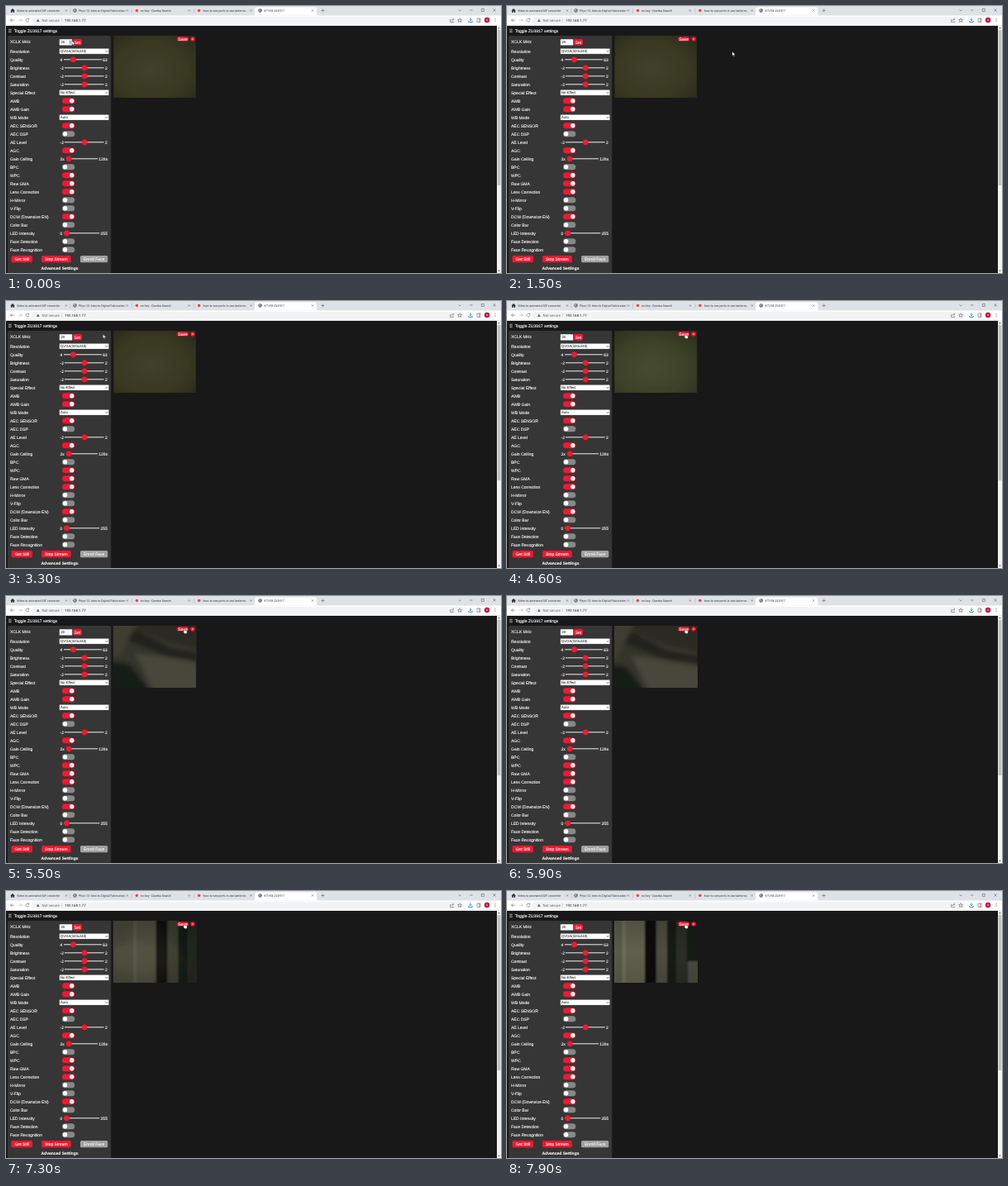
Recreate the animation shown at these times as an HTML page. Size 600x323 px, loop 8 s.

```html
<!DOCTYPE html>
<html lang="en">
<head>
<meta charset="utf-8">
<title>Camera settings</title>
<style>
  html, body { margin: 0; width: 100%; height: 100%; overflow: hidden; background: #181818; }
  svg { display: block; width: 100vw; height: 100vh; }
  text { font: 5px "Liberation Sans", Arial, sans-serif; fill: #f4f4f4; stroke: #f4f4f4; stroke-width: .13; white-space: pre; text-rendering: geometricPrecision; }
  .tab, .url, .field { stroke: none; }
  .tab { font: 3.65px Roboto, "Open Sans", sans-serif; fill: #33363a; }
  .url { font: 4.4px Roboto, "Open Sans", sans-serif; fill: #202124; }
  .grey { fill: #5f6368; }
  .field { font-size: 4.25px; fill: #000; }
  .mid { text-anchor: middle; }
  .line { fill: none; stroke: #5f6368; stroke-width: .6; }

  #arrow, #hand, #spin, .scene, .pan { animation: 8s linear infinite; }
  #arrow { animation-name: move; animation-timing-function: ease-in-out; }
  #hand { animation-name: point; animation-timing-function: step-end; }
  #spin { animation-name: spin; animation-timing-function: step-end; }
  @keyframes move {
    0%, 1.25% { transform: translate(80px, 42px); opacity: 1; }
    11.25%, 31.25% { transform: translate(273px, 55px); }
    33.75% { transform: translate(255px, 53px); }
    40%, 43.75% { transform: translate(117.5px, 40px); }
    50% { transform: translate(258px, 50px); }
    56.2% { transform: translate(216px, 39px); opacity: 1; }
    56.25%, 100% { transform: translate(216px, 39px); opacity: 0; }
  }
  @keyframes point { 0% { opacity: 0; } 56.25%, 100% { opacity: 1; } }
  @keyframes spin { 0% { opacity: 1; } 2.5%, 100% { opacity: 0; } }

  #lit { animation-name: lit; }
  #cloth { animation-name: cloth; }
  #dark { animation-name: dark; }
  #bars { animation-name: bars; }
  #clothPan { animation-name: clothPan; }
  #barsPan { animation-name: barsPan; }
  @keyframes lit { 0%, 47% { opacity: 0; } 56%, 100% { opacity: 1; } }
  @keyframes cloth { 0%, 61% { opacity: 0; } 66%, 100% { opacity: 1; } }
  @keyframes dark { 0%, 75% { opacity: 0; } 81%, 100% { opacity: 1; } }
  @keyframes bars { 0%, 87.5% { opacity: 0; } 93%, 100% { opacity: 1; } }
  @keyframes clothPan { 0%, 61% { transform: translate(14px, -8px); } 73.75% { transform: none; } 82%, 100% { transform: translate(-10px, 5px); } }
  @keyframes barsPan { 0%, 87.5% { transform: translateX(22px); } 98.75%, 100% { transform: none; } }
</style>
</head>
<body>
<svg id="stage" viewBox="0 0 600 323" preserveAspectRatio="none"></svg>
<script>
const RED = '#f8162f';

const box = (x, y, w, h, fill, r = 0, more = '') =>
  `<rect x="${x}" y="${y}" width="${w}" height="${h}" rx="${r}" fill="${fill}" ${more}/>`;
const dot = (x, y, r, fill) => `<circle cx="${x}" cy="${y}" r="${r}" fill="${fill}"/>`;
const text = (x, y, s, cls = '', more = '') => `<text x="${x}" y="${y}" class="${cls}" ${more}>${s}</text>`;
const path = (d, more = 'class="line"') => `<path d="${d}" ${more}/>`;
const cross = (x, y, r, more) =>
  path(`M${x - r} ${y - r}l${2 * r} ${2 * r}m0 ${-2 * r}l${-2 * r} ${2 * r}`, more);
const globe = x => dot(x, 5.5, 2.3, '#5f6368') +
  path(`M${x - 1.4} 4.3l1.5 .4 -.6 1.3 -1 .2M${x + .5} 6.9l1 -1.2`, 'stroke="#fff" stroke-width=".6" fill="none"');

function tab(x, end, title, icon) {
  const id = 'clip' + x;
  return icon + `<clipPath id="${id}"><rect x="${x}" y="1" width="${end - x}" height="9"/></clipPath>` +
    text(x, 6.8, title, 'tab', `clip-path="url(#${id})"`);
}

function browser() {
  const house = path('M5.2 5.8l2.8 -2.7 2.8 2.7h-.8v2.2h-1.4v-1.6h-1.2v1.6h-1.4v-2.2z', 'fill="#333"');
  return box(0, 0, 600, 12, '#dee1e6') +
    path('M299 11.5q2.5 0 2.5 -2.5v-5q0 -2.5 2.5 -2.5h70q2.5 0 2.5 2.5v5q0 2.5 2.5 2.5z', 'fill="#fff"') +
    tab(13, 75, 'Video to animated GIF converter', house) +
    tab(88, 144.5, 'Phys-12: Intro to Digital Fabrication', globe(83.5)) +
    tab(163, 218, 'no key - Quorba Search', dot(158.5, 5.5, 1.7, '#ea4335')) +
    tab(239, 297, 'how to see ports in use lanterns', dot(234, 5.5, 1.7, '#ea4335')) +
    tab(313, 367, 'KTV58 ZU3917', globe(308)) +
    [78, 152.5, 228].map(x => path(`M${x} 3v5.5`, 'stroke="#9aa0a6" stroke-width=".4"')).join('') +
    [73, 147, 222, 297, 371.5].map(x => cross(x, 5.5, 1)).join('') +
    path('M382 5.5h4m-2 -2v4') +
    path('M548.5 4.5l1.6 1.6 1.6 -1.6M562 5h3.5M576.3 3.5h3v3h-3z') + cross(592, 5, 1.6) +
    box(0, 11.5, 600, 12.5, '#fff') +
    box(31, 13, 524, 8.6, '#f1f3f4', 4.3) +
    path('M9.8 17.2h-4.4m2 -2l-2 2 2 2') +
    path('M15 17.2h4.4m-2 -2l2 2 -2 2', 'class="line" opacity=".5"') +
    path('M27.5 15.8a2 2 0 1 0 .4 1.8M27.8 14.6v1.5h-1.5') +
    path('M37 19l1.8 -3.4 1.8 3.4z', 'fill="#5f6368"') +
    text(43.5, 18.8, 'Not secure', 'url grey') +
    path('M67.5 15v4.5', 'stroke="#bbb" stroke-width=".5"') +
    text(71, 18.8, '192.168.1.77', 'url') +
    path('M539.5 16.5h-1v3h4v-1M540 18q.4 -2 2.6 -2m-1 -1.2l1.2 1.2 -1.2 1.2') +
    path('M550 14.9l.7 1.5 1.7 .2 -1.2 1.1 .3 1.7 -1.5 -.8 -1.5 .8 .3 -1.7 -1.2 -1.1 1.7 -.2z') +
    path('M563 14.4v3.4m-1.5 -1.5l1.5 1.5 1.5 -1.5M560.8 18v1.5h4.4v-1.5', 'fill="none" stroke="#1a73e8" stroke-width=".8"') +
    path('M571 15h4v4.4h-4zM573.7 15v4.4') +
    dot(583, 17, 3.2, '#c5133f') + text(583, 18.4, 'A', 'tab mid', 'style="fill:#fff"') +
    [15.3, 17, 18.7].map(y => dot(593, y, .5, '#5f6368')).join('') +
    box(0, 23.5, 600, .5, '#d5d7da');
}

const slider = (y, low, x1, x2, high, at) => text(65.5, y + 1.8, low) +
  box(x1, y - .5, x2 - x1, 1, '#efefef') + dot(at, y, 3.4, RED) + text(x2 + 1.3, y + 1.8, high);
const toggle = (y, on) => box(68, y - 3.5, 15.3, 7, on ? RED : '#888', 3.5) + dot(on ? 79.7 : 71.6, y, 2.7, '#fff');
const select = (y, s) => box(64.8, y - 3.3, 59.8, 6.6, '#fff', .5, 'stroke="#767676" stroke-width=".3"') +
  text(66, y + 1.5, s, 'field') + path(`M120.7 ${y - .6}l1.3 1.3 1.3 -1.3`, 'fill="none" stroke="#000" stroke-width=".6"');
const button = (x, y, w, h, s, fill) => box(x, y, w, h, fill, 1.5) + text(x + w / 2, y + h / 2 + 1.8, s, 'mid');

const on = y => toggle(y, true), off = y => toggle(y, false);
const level = y => slider(y, '-2', 71, 118.7, '2', 95.2);
const rows = [
  ['Resolution', y => select(y, 'QVGA(320x240)')],
  ['Quality', y => slider(y, '4', 70, 116, '63', 81.5)],
  ['Brightness', level], ['Contrast', level], ['Saturation', level],
  ['Special Effect', y => select(y, 'No Effect')],
  ['AWB', on], ['AWB Gain', on],
  ['WB Mode', y => select(y, 'Auto')],
  ['AEC SENSOR', on], ['AEC DSP', off], ['AE Level', level], ['AGC', on],
  ['Gain Ceiling', y => slider(y, '2x', 73, 111, '128x', 76.2)],
  ['BPC', off], ['WPC', on], ['Raw GMA', on], ['Lens Correction', on],
  ['H-Mirror', off], ['V-Flip', off], ['DCW (Downsize EN)', on], ['Color Bar', off],
  ['LED Intensity', y => slider(y, '0', 70, 113.3, '255', 73.7)],
  ['Face Detection', off], ['Face Recognition', off]
];

function panel() {
  return path('M3 28.3h3.6M3 30h3.6M3 31.7h3.6', 'stroke="#efefef" stroke-width=".6"') +
    text(9.7, 32, 'Toggle ZU3917 settings') +
    box(2, 36, 125.3, 290, '#363636', 1.5) +
    text(5, 45.3, 'XCLK MHz') +
    box(64.8, 40.2, 15.4, 7.2, '#fff', .5) + text(66.5, 45.3, '20', 'field') +
    `<g id="spin">${box(76, 40.8, 3.8, 6, '#e4e4e4')}${path('M77 43.2l.9 -1.2 .9 1.2zM77 44.5l.9 1.2 .9 -1.2z', 'fill="#555"')}</g>` +
    button(81, 40, 11, 7.5, 'Set', RED) +
    rows.map(([label, control], i) => {
      const y = 54.8 + 10 * i;
      return text(5, y + 1.8, label) + control(y);
    }).join('') +
    button(6.5, 302, 25.5, 8.3, 'Get Still', RED) +
    button(43, 302, 35.7, 8.3, 'Stop Stream', RED) +
    button(90, 302, 33.3, 8.3, 'Enroll Face', '#a0a0a0') +
    text(65, 318.8, 'Advanced Settings', 'mid', 'style="font-weight:bold"');
}

const defs = `<defs>
  <clipPath id="view"><rect x="130.3" y="36" width="100" height="75"/></clipPath>
  <filter id="soft" x="-30%" y="-30%" width="160%" height="160%"><feGaussianBlur stdDeviation="2.5"/></filter>
  <filter id="edge" x="-10%" y="-10%" width="120%" height="120%"><feGaussianBlur stdDeviation=".9"/></filter>
  <radialGradient id="olive" cx=".45" cy=".55" r=".75"><stop offset="0" stop-color="#3f3f2a"/><stop offset=".6" stop-color="#37371f"/><stop offset="1" stop-color="#25261a"/></radialGradient>
  <radialGradient id="green" cx=".45" cy=".6" r=".75"><stop offset="0" stop-color="#454a2f"/><stop offset=".6" stop-color="#3b3f25"/><stop offset="1" stop-color="#292d1d"/></radialGradient>
  <radialGradient id="dim" cx=".4" cy=".55" r=".7"><stop offset="0" stop-color="#35352a"/><stop offset=".5" stop-color="#24251d"/><stop offset="1" stop-color="#12130f"/></radialGradient>
  <linearGradient id="shade" x2="0" y2="1"><stop offset="0" stop-color="#000" stop-opacity=".15"/><stop offset=".5" stop-color="#000" stop-opacity="0"/><stop offset="1" stop-color="#000" stop-opacity=".1"/></linearGradient>
  <pattern id="weave" width="2" height="2" patternUnits="userSpaceOnUse" patternTransform="rotate(12)"><path d="M0 .5h1M1 1.5h1" stroke="#8c8c68" stroke-width=".4" opacity=".16"/></pattern>
</defs>`;

function camera() {
  const fill = (f, more) => box(130.3, 36, 100, 75, f, 0, more);
  const blur = (d, color) => path(d, `fill="${color}"`);
  return `<g clip-path="url(#view)">${fill('url(#olive)')}
    <g class="scene" id="lit">${fill('url(#green)')}</g>${fill('url(#weave)')}
    <g class="scene" id="cloth">${fill('#34352b')}<g class="pan" id="clothPan" filter="url(#soft)">
      ${blur('M110 26h46l-12 26 -10 24h-24z', '#3c3d33')}
      ${blur('M158 26h86v44l-52 -12 -38 -14z', '#292a23')}
      ${blur('M142 56l10 -12 40 22 52 10v8l-54 -8z', '#20211b')}
      ${blur('M150 72l32 4 58 10v34h-66z', '#46463a')}
      ${blur('M110 82l34 4 26 34h-60z', '#191a15')}</g></g>
    <g class="scene" id="dark">${fill('url(#dim)')}${fill('url(#weave)')}
      <g filter="url(#soft)">${blur('M130 34h22l-8 28 -14 12z', '#1a1b15')}${blur('M134 68l26 -8 30 10 8 16 -30 14 -34 -6z', '#38372a')}${blur('M184 36h50v66l-22 -30z', '#11120f')}</g></g>
    <g class="scene" id="bars">${fill('#5e5f4c')}<g class="pan" id="barsPan" filter="url(#edge)">
      ${box(100, 32, 40, 84, '#5a5b48')}${box(140, 32, 3.5, 84, '#717260')}
      ${box(143.5, 32, 23.5, 84, '#5f604d')}${box(167, 32, 14, 84, '#0b0c0a')}
      ${box(181, 32, 13, 84, '#4d4e41')}${box(194, 32, 42, 84, '#191a15')}
      ${box(205, 32, 13, 84, '#2c2d25')}${box(219, 85, 20, 30, '#4a4b3e')}</g>${fill('url(#shade)')}</g>
  </g>` +
    box(207.3, 37.2, 14, 5.4, RED, 2.7) + text(214.3, 41.7, 'Save', 'mid') +
    dot(226.2, 40, 2.7, RED) + cross(226.2, 40, .9, 'stroke="#fff" stroke-width=".5"');
}

const scrollbar = box(595, 24, 5, 299, '#f1f1f1') + box(595.6, 29, 3.8, 188, '#c1c1c1') +
  path('M596.2 27.3l1.3 -1.6 1.3 1.6zM596.2 319.7l1.3 1.6 1.3 -1.6z', 'fill="#505050"');

const ink = 'fill="#fff" stroke="#000" stroke-width=".35" stroke-linejoin="round"';
const pointers = `<g id="arrow">${path('M0 0v5.3l1.2 -1.1 .9 2 .9 -.4 -.9 -1.9h1.6z', ink)}</g>` +
  `<g id="hand">${path('M215.8 39.3q.7 -.5 1 .2v2l2 .5q.9 .3 .8 1.2l-.5 2.4h-2.6l-1.9 -2.7q0 -.7 .8 -.4l.4 .4z', ink)}</g>`;

document.getElementById('stage').innerHTML =
  defs + box(0, 0, 600, 323, '#181818') + browser() + panel() + camera() + scrollbar + pointers;
</script>
</body>
</html>
```
